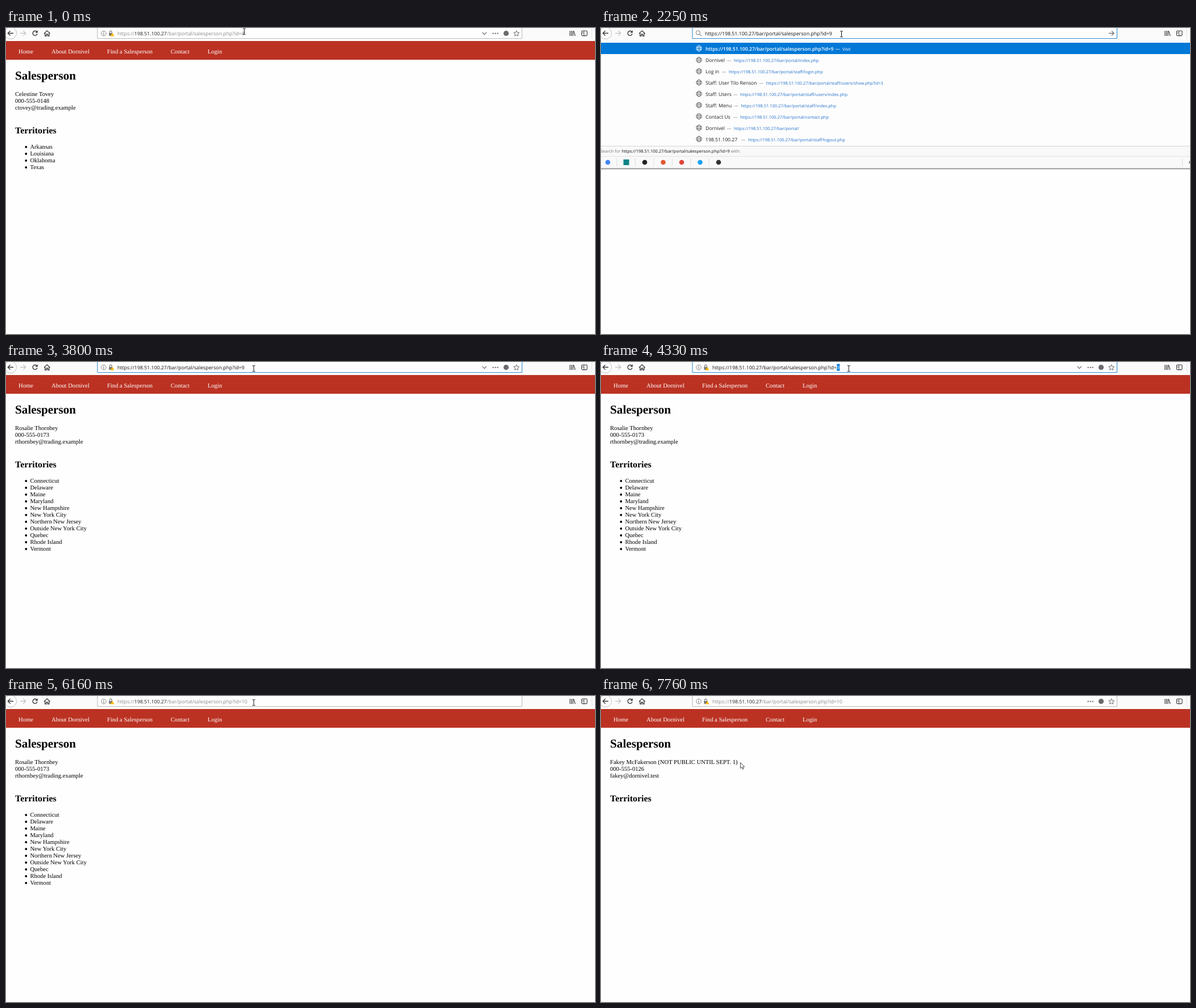
These frames come from a looping animation (1037 by 540 pixels, 8 s). An HTML page:

```html
<!DOCTYPE html>
<html lang="en">
<head>
<meta charset="utf-8">
<title>Salesperson</title>
<style>
html, body { margin: 0; width: 100%; height: 100%; overflow: hidden; background: #fefefe; }
svg { display: block; text-rendering: geometricPrecision; font-family: "Open Sans", "Noto Sans", sans-serif; }
.page { font-family: "Liberation Serif", "Times New Roman", serif; }
</style>
</head>
<body>
<svg id="stage" width="1037" height="540"></svg>
<script>
const LOOP = 8000;
const HOST = '198.51.100.27';
const ROOT = `https://${HOST}/bar/portal/`;
const BLUE = '#0078d7', DARK = '#3a3a3c', GREY = '#8a8a8c';
const URL_SIZE = 8.78;

const people = [
  { lines: ['Celestine Tovey', '000-555-0148', 'ctovey@trading.example'],
    areas: ['Arkansas', 'Louisiana', 'Oklahoma', 'Texas'] },
  { lines: ['Rosalie Thornbey', '000-555-0173', 'rthornbey@trading.example'],
    areas: ['Connecticut', 'Delaware', 'Maine', 'Maryland', 'New Hampshire', 'New York City',
      'Northern New Jersey', 'Outside New York City', 'Quebec', 'Rhode Island', 'Vermont'] },
  { lines: ['Fakey McFakerson (NOT PUBLIC UNTIL SEPT. 1)', '000-555-0126', 'fakey@dornivel.test'],
    areas: [] }
];

// title, path, x of the address
const history = [
  ['Dornivel', 'index.php', 234],
  ['Log in', 'staff/login.php', 225],
  ['Staff: User Tilo Renson', 'staff/users/show.php?id=3', 290.5],
  ['Staff: Users', 'staff/users/index.php', 245],
  ['Staff: Menu', 'staff/index.php', 246.5],
  ['Contact Us', 'contact.php', 245],
  ['Dornivel', '', 234],
  [HOST, 'staff/logout.php', 259]
];

// Each entry changes part of the state at its time.
const events = [
  [0, { id: '8', person: 0, mode: 'idle', rows: 0, icons: true, chevron: true, load: 'ready', caret: false, beam: true, at: [419.5, 6] }],
  [280, { at: [421, 8] }],
  [400, { at: [423.5, 10.5] }],
  [700, { mode: 'all' }],
  [1110, { mode: 'digit' }],
  [2130, { mode: 'typed', id: '9', rows: 1, caret: true }],
  [2250, { rows: 9, caret: false }],
  [2400, { rows: 0 }],
  [2530, { mode: 'idle', icons: false }],
  [2680, { person: 1, load: 'stop' }],
  [2810, { icons: true }],
  [2950, { load: 'fade' }],
  [3080, { load: 'wait' }],
  [3220, { at: [426, 10.5] }],
  [3350, { at: [429, 11] }],
  [3500, { load: 'ready', at: [435, 11.5] }],
  [3650, { at: [436.2, 11.5] }],
  [3800, { mode: 'focus' }],
  [3920, { mode: 'all' }],
  [4330, { mode: 'digit' }],
  [5730, { mode: 'typed', id: '1', rows: 1, caret: true }],
  [5880, { id: '10' }],
  [6160, { mode: 'idle', rows: 0, icons: false, caret: false }],
  [6310, { load: 'stop' }],
  [6435, { person: 2 }],
  [6560, { icons: true }],
  [6710, { load: 'fade' }],
  [6850, { load: 'wait', at: [433, 14] }],
  [6980, { beam: false, at: [418, 20] }],
  [7120, { chevron: false, at: [330, 62] }],
  [7250, { load: 'ready', at: [221, 107] }],
  [7390, { at: [227, 110] }],
  [7510, { at: [235, 113.5] }],
  [7640, { at: [242, 116] }],
  [7760, { at: [245.5, 117.5] }]
];

const stage = document.getElementById('stage');
const pen = document.createElement('canvas').getContext('2d');
const width = s => {
  pen.font = '100px "Open Sans", "Noto Sans", sans-serif';
  return pen.measureText(s).width * URL_SIZE / 100;
};

const text = (x, y, s, size, fill, more = '') =>
  `<text x="${x}" y="${y}" font-size="${size}" fill="${fill}" ${more}>${s}</text>`;
const rect = (x, y, w, h, fill, more = '') =>
  `<rect x="${x}" y="${y}" width="${w}" height="${h}" fill="${fill}" ${more}/>`;
const line = (d, color = DARK, w = 1.2) =>
  `<path d="${d}" fill="none" stroke="${color}" stroke-width="${w}"/>`;
const dot = (x, y, r, fill, more = '') =>
  `<circle cx="${x}" cy="${y}" r="${r}" fill="${fill}" ${more}/>`;
const ring = (x, y, r, color, w = 1) => dot(x, y, r, 'none', `stroke="${color}" stroke-width="${w}"`);
const tint = (s, fill) => `<tspan fill="${fill}">${s}</tspan>`;

const globe = (y, color) => ring(172.5, y, 4.7, color, .9) +
  `<ellipse cx="172.5" cy="${y}" rx="2.2" ry="4.7" fill="none" stroke="${color}" stroke-width=".8"/>` +
  line(`M168 ${y - 1.6}h9M168 ${y + 1.6}h9`, color, .8);

function page({ lines, areas }) {
  const nav = [['Home', 22], ['About Dornivel', 80], ['Find a Salesperson', 178], ['Contact', 290], ['Login', 355]];
  return '<g class="page">' + rect(0, 23, 1037, 33, '#bb3223') +
    nav.map(([s, x]) => text(x, 44.6, s, 10.62, '#fff')).join('') +
    text(16, 91, 'Salesperson', 21.2, '#000', 'font-weight="bold"') +
    lines.map((s, i) => text(16, 119.7 + 12 * i, s, 10.62, '#000')).join('') +
    text(16, 186, 'Territories', 15.9, '#000', 'font-weight="bold"') +
    areas.map((s, i) => dot(35.3, 210 + 12 * i, 1.9, '#000') +
      text(42.4, 212.8 + 12 * i, s, 10.62, '#000')).join('') + '</g>';
}

function reload(kind) {
  if (kind === 'stop' || kind === 'fade')
    return line('M47 5.5l8 8M55 5.5l-8 8', kind === 'stop' ? '#9a9a9c' : '#cfcfd1', 1.1);
  const color = kind === 'wait' ? '#b5b5b7' : DARK;
  return line('M54 6.4A4 4 0 1 0 55 10.3', color, 1.4) +
    `<path d="M55.8 4v4.4h-4.4z" fill="${color}"/>`;
}

function toolbar(s) {
  const active = s.mode !== 'idle';
  return rect(0, 0, 1037, 23, '#fbfbfb') +
    dot(8, 9, 10.5, '#fff', 'stroke="#b9b9b9" stroke-width=".9"') +
    line('M13 9.3H3.5M7.6 5l-4.3 4.3 4.3 4.3', DARK, 1.4) +
    line('M25 9.3h9.5M30.4 5l4.3 4.3-4.3 4.3', '#bdbdbf', 1.2) +
    reload(s.load) +
    line('M67 9.8L72.3 4.8l5.3 5M68.7 9v5h2.4v-3h2.4v3h2.4v-5', DARK, 1.3) +
    rect(161, -4, 747.5, 22.5, '#fefefe', `rx="1" stroke="${active ? '#2f8fd8' : '#bcbcbe'}" stroke-width="1.1"`) +
    line('M993 5v9M995.6 5v9M998.2 5v9M999.5 5.4l2.6 8.6', DARK, 1.2) +
    rect(1013.5, 5, 9.6, 8.6, 'none', `rx="1.5" stroke="${DARK}" stroke-width="1.1"`) +
    line('M1017.6 5v8.6M1014.8 7.5h1.6M1014.8 9.5h1.6', DARK, .9) +
    line('M1031.5 0v19', '#e4e4e4', 1);
}

function barIcons(s) {
  if (s.mode === 'typed')
    return ring(170.8, 8.2, 3.4, GREY, 1.1) + line('M173.2 10.6l4 3.8', GREY, 1.3) +
      line('M894 9.3h9M899 5.2l4.1 4.1-4.1 4.1', '#666', 1.2);
  let out = ring(172, 9.5, 4.3, '#777', .9) + line('M172 8.7v3.4M172 6.7v1.1', '#666', 1.1) +
    rect(181.3, 8.8, 6, 5, '#777', 'rx=".6"') + line('M182.5 9V7a1.9 1.9 0 0 1 3.8 0v2', '#777', 1.1) +
    '<path d="M187.2 8.4l3.4 6h-6.8z" fill="#f5b800"/>';
  if (!s.icons) return out;
  if (s.chevron) out += line('M838.6 7.6l3.7 3.7 3.7-3.7', '#666', 1.2);
  const star = [...Array(10).keys()].map(i => {
    const a = Math.PI * (i / 5 - .5), r = i % 2 ? 2.4 : 5.2;
    return `${898.7 + r * Math.cos(a)},${9.9 + r * Math.sin(a)}`;
  });
  return out + [857.7, 861.7, 865.7].map(x => dot(x, 9.6, 1.2, '#666')).join('') +
    dot(880.5, 9.4, 4.6, '#6b6b6d') +
    `<polygon points="${star.join(' ')}" fill="none" stroke="#666"/>`;
}

function address(s, url) {
  const x = s.mode === 'typed' ? 183 : 196, y = 13;
  const put = (str, more) => text(x, y, str, URL_SIZE, '#111', more);
  if (s.mode === 'idle') {
    const [head, tail] = url.split(HOST);
    return put(tint(head, GREY) + tint(HOST, '#222') + tint(tail, GREY));
  }
  if (s.mode === 'all')
    return rect(x, 3, width(url), 12, BLUE) + put(tint(url, '#fff'));
  if (s.mode === 'digit') {
    const head = url.slice(0, -1), w = width(head);
    return rect(x + w, 3.5, width(url) - w, 12, BLUE) + put(head + tint(url.slice(-1), '#fff'));
  }
  return put(url) + (s.caret ? rect(x + width(url) + .3, 4.3, .9, 11, '#000') : '');
}

function dropdown(rows, url) {
  const end = rows > 1 ? 208 : 49;
  const engines = ['#4285f4', '#0c8484', '#222', '#de5833', '#e0463c', '#1da1f2', '#333'];
  let out = rect(0, 23, 1037, end + 17, '#fdfdfd') + rect(0, 26, 1037, 20, BLUE) + globe(36, '#fff') +
    text(184, 39.7, `<tspan font-weight="600">${url}</tspan><tspan dx="3">—</tspan><tspan dx="4" font-size="7.5">Visit</tspan>`, 8.58, '#fff');
  history.slice(0, rows - 1).forEach(([title, path, x], i) => {
    const y = 60 + 19.94 * i;
    out += globe(y - 3.7, '#555') + text(184, y, title, 8.65, '#222') +
      text(x - 12.2, y, '—', 7.8, '#777') + text(x, y, ROOT + path, 7.46, '#2672cb');
  });
  out += rect(0, end, 1037, 40, '#f9f9fa') + rect(0, end, 1037, 1, '#d6d6d6') +
    text(-1, end + 12.2, `Search for ${tint(url, '#111')} with:`, 7.46, '#777') +
    rect(0, end + 18, 1037, .8, '#dcdcdc');
  engines.forEach((color, i) => {
    const x = 12 + 32.5 * i, y = end + 29;
    out += i === 1 ? rect(x - 5, y - 5, 10, 10, color) : dot(x, y, 4.3, color);
    if (i < 6) out += rect(x + 15.4, end + 22, .8, 14, '#d8d8d8');
  });
  return out + rect(1023, end + 22, .8, 14, '#d8d8d8') + ring(1038.5, end + 29, 2.4, '#555', 1.3) +
    rect(0, end + 39.3, 1037, 1.7, '#9b9b9b') + rect(0, end + 41, 1037, 1.5, '#e6e6e6');
}

function pointer({ beam, at: [x, y] }) {
  const shape = beam
    ? line('M-2.4-5h1.8L0-4.4.6-5h1.8M0-4.6v9.4M-2.4 5.2h1.8L0 4.6l.6.6h1.8', '#111', 1)
    : '<path d="M0 0v10.2l2.4-2.1 1.6 3.7 1.6-.7-1.6-3.6h3.2z" fill="#fff" stroke="#222" stroke-width=".8"/>';
  return `<g transform="translate(${x} ${y})">${shape}</g>`;
}

function draw(s) {
  const url = `${ROOT}salesperson.php?id=${s.id}`;
  stage.innerHTML = rect(0, 0, 1037, 540, '#fefefe') + page(people[s.person]) +
    toolbar(s) + barIcons(s) + address(s, url) +
    (s.rows ? dropdown(s.rows, url) : '') + pointer(s);
}

let shown = 0;
function tick(now) {
  const t = now % LOOP;
  const past = events.filter(([start]) => start <= t);
  if (past.length !== shown) {
    shown = past.length;
    draw(Object.assign({}, ...past.map(([, change]) => change)));
  }
  requestAnimationFrame(tick);
}
tick(performance.now());
</script>
</body>
</html>
```
